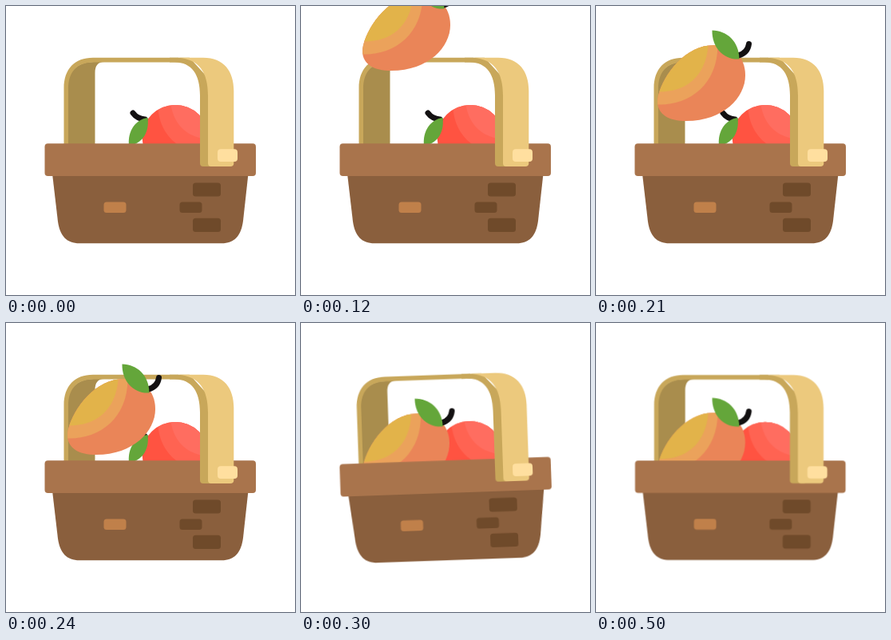
Recreate the animation shown at these times as an HTML page. Size 362x362 px, loop 1.6 s.

```html
<!DOCTYPE html>
<html lang="en">
<head>
<meta charset="utf-8">
<title>Fruit basket</title>
<style>
  html, body { margin: 0; width: 100%; height: 100%; overflow: hidden; background: #fff; }
  svg { display: block; width: 100%; height: 100%; }
  #basket { transform-origin: 181px 181px; }
  .stem { fill: none; stroke: #131112; stroke-width: 7; stroke-linecap: round; }
  .leaf { fill: #64a63a; }
  .brick { fill: #6f4a2a; }
</style>
</head>
<body>
<svg viewBox="0 0 362 362">
  <defs>
    <path id="mangoShape" d="M78 112C85 85 112 49 148 49C171 49 187 63 187 87C187 114 160 144 113 144C88 144 73 133 78 112Z"/>
    <ellipse id="appleShape" cx="212" cy="164" rx="41.5" ry="40"/>
    <clipPath id="mangoClip"><use href="#mangoShape"/></clipPath>
    <clipPath id="appleClip"><use href="#appleShape"/></clipPath>
  </defs>

  <g id="basket">
    <!-- back of the handle -->
    <path fill="#a98d4d" d="M77 174V104C77 82 89 70 110 70H123C115 70 111.500 75 111.500 84V174Z"/>
    <path fill="#c8a75a" d="M72.500 174V103C72.500 79 86 64.800 109 64.800H216V70.500H110C89 70.500 78 82 78 104V174Z"/>

    <g id="apple">
      <use href="#appleShape" fill="#ff5341"/>
      <g clip-path="url(#appleClip)">
        <path fill="#ff6352" d="M190 120C190 146 200 166 222 178H260V120Z"/>
        <path fill="#ff6d60" d="M206 120C209 145 222 161 246 166H260V120Z"/>
      </g>
      <path class="stem" d="M159 134Q164 141 174 142"/>
      <path class="leaf" d="M177.500 140C162 142 152 157 154 175C169 173 180 160 177.500 140Z"/>
    </g>

    <g id="mango">
      <use href="#mangoShape" fill="#ea8558"/>
      <g clip-path="url(#mangoClip)">
        <path fill="#eba25b" d="M70 123C115 128 157 98 152 40H70Z"/>
        <path fill="#e2b34a" d="M70 107C110 111 141 90 141 40H70Z"/>
      </g>
      <path class="stem" d="M178 62Q190 59 191.500 47.500"/>
      <path class="leaf" d="M145.500 30.500C164 31 179 44 179.500 66.500C160 68 145 52 145.500 30.500Z"/>
    </g>

    <path fill="#8a5f3d" d="M58 210H303.500L297 269C294.500 288 286 297.300 270 297.300H92C76 297.300 67.500 288 65 270Z"/>
    <rect fill="#a9744c" x="48.500" y="172.300" width="264.500" height="40.700" rx="4"/>

    <!-- front of the handle -->
    <path fill="#c8a75a" d="M205 64.800H230L262 100V201H247Q243 201 243 197V112C243 86 233 70.500 211 70.500H205Z"/>
    <path fill="#ecc97d" d="M216 64.800H247C273 64.800 285.300 82 285.300 106V197Q285.300 201 281 201H257Q253 201 253 197V112C253 83 242 67 216 64.800Z"/>
    <rect fill="#ffdf9f" x="265" y="179.300" width="25" height="15.700" rx="4"/>

    <rect fill="#c0804a" x="122.500" y="245.500" width="28" height="13.500" rx="3.500"/>
    <rect class="brick" x="234" y="221.500" width="35" height="17" rx="3.500"/>
    <rect class="brick" x="217.500" y="245.500" width="28" height="13.500" rx="3.500"/>
    <rect class="brick" x="234" y="265.800" width="35" height="17.200" rx="3.500"/>
  </g>
</svg>
<script>
  const LOOP = 1600;
  const STEP = 30;
  const DROP = 21;

  // Each [ms, transform] pose holds until the next one.
  function play(id, poses) {
    const frames = poses.map(([ms, transform]) => ({ offset: ms / LOOP, transform, easing: "step-end" }));
    frames.push({ offset: 1, transform: poses[poses.length - 1][1] });
    const anim = document.getElementById(id).animate(frames, { duration: LOOP, iterations: Infinity });
    anim.startTime = document.timeline.currentTime;
  }

  const fall = Array.from({ length: 11 }, (_, i) => [i * STEP, `translateY(${(i - 7) * DROP}px)`]);
  const wobble = [
    [0, "rotate(0deg)"],
    [300, "rotate(-2deg)"],
    [400, "rotate(1deg) scale(0.997)"],
    [500, "rotate(0deg) scale(0.997)"]
  ];

  play("mango", fall);
  play("basket", wobble);
</script>
</body>
</html>
```
